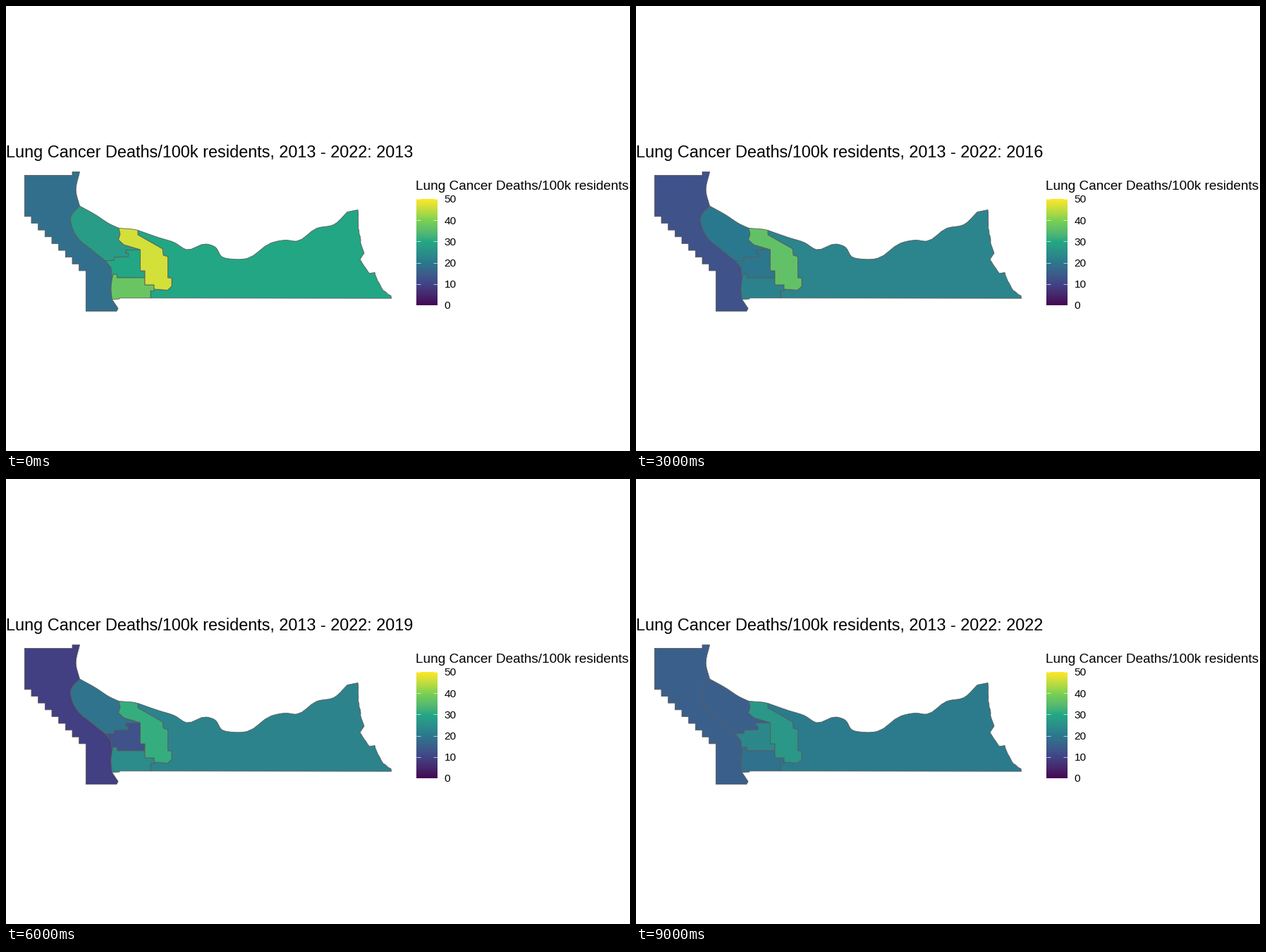
Write a matplotlib script that moves like this. It is 885x632 px and loops after 10 s.

```python
import numpy as np
import matplotlib.pyplot as plt
from matplotlib.animation import FuncAnimation
from matplotlib.colors import ListedColormap, to_rgb
from matplotlib.patches import Polygon

W, H, DPI = 885, 632, 64
PT = 72 / DPI  # points per pixel
YEARS = np.arange(2013, 2023)
LABEL = "Lung Cancer Deaths/100k residents"
STOPS = ["#440154", "#414487", "#2A788E", "#22A884", "#7AD151", "#FDE725"]

plt.rcParams["font.family"] = "Liberation Sans"


def lab_gradient(stops, n=300):
    """Blend evenly spaced colours in cube-rooted XYZ, which equals blending in Lab."""
    to_xyz = np.array([[0.4124, 0.3576, 0.1805],
                       [0.2126, 0.7152, 0.0722],
                       [0.0193, 0.1192, 0.9505]])
    linear = ((np.array([to_rgb(c) for c in stops]) + 0.055) / 1.055) ** 2.4
    roots = np.cbrt(linear @ to_xyz.T)
    at = np.linspace(0, len(stops) - 1, n)
    mixed = np.stack([np.interp(at, range(len(stops)), ch) for ch in roots.T], axis=1)
    linear = np.clip(mixed ** 3 @ np.linalg.inv(to_xyz).T, 0, 1)
    return ListedColormap(np.clip(1.055 * linear ** (1 / 2.4) - 0.055, 0, 1))


def curve(points, n=6):
    """Smooth line through the points: cubic Hermite over chord length."""
    p = np.array(points, float)
    t = np.r_[0, np.cumsum(np.hypot(*np.diff(p, axis=0).T))]
    slope = np.gradient(p, t, axis=0)
    line = []
    for a, b, ma, mb, d in zip(p, p[1:], slope, slope[1:], np.diff(t)):
        for s in np.arange(n) / n:
            line.append(a + (b - a) * s * s * (3 - 2 * s)
                        + d * s * (1 - s) * (ma * (1 - s) - mb * s))
    return line + [p[-1]]


def rough(points, gap=4, size=0.6):
    """Straight pieces broken up by small seeded wobbles."""
    rng = np.random.default_rng(4)
    line = []
    for a, b in zip(points, points[1:]):
        a, b = np.array(a, float), np.array(b, float)
        n = max(1, int(np.hypot(*(b - a)) / gap))
        line.append(a)
        line += [a + (b - a) * k / n + rng.uniform(-size, size, 2) for k in range(1, n)]
    return line + [np.array(points[-1], float)]


def stairs(x, y, run, rise, count):
    """Corners of a staircase going down to the right."""
    return [(x + run * (k + j), y + rise * k) for k in range(count) for j in (0, 1)]


# Borders shared by two regions, used in either direction
west_north = curve([(104.5, 284), (92, 299.5), (94, 315), (104, 332), (118, 343.5), (141, 362)])
west_center = [(141, 362), (149, 371.5), (150.5, 387)]
west_south = curve([(150.5, 387), (149, 400), (150.5, 416.8)])
north_strip = [(160, 315.5), (162, 324), (159.5, 332), (167, 339), (190.5, 346)]
north_center = [(141, 362), (153, 361.5), (153.5, 357), (173.5, 356), (173.5, 351),
                (170, 351), (170, 347), (190.5, 346)]
center_strip = [(190.5, 346), (190.5, 376), (197, 376), (197, 386)]
center_south = [(150.5, 387), (152, 381), (157, 381), (157.5, 386), (197, 386)]
south_strip = [(197, 386), (197, 396), (210, 396), (210, 402)]
south_east = [(210, 402), (210, 404.5), (205, 404.5), (205, 414.8)]
strip_east = [(187, 318.5), (187, 325), (222, 345), (223, 354), (229.5, 356),
              (229.5, 386), (235, 386.5), (235, 398), (229, 403.5), (210, 402)]

# Outer borders
west_top = [(26.3, 240.4), (94, 240.4), (94, 235.6)]
west_river = curve([(104.5, 235.6), (99.2, 262), (104.5, 284)])
west_foot = [(159, 429.5), (157, 433.4), (113.3, 433.4)]
north_river = curve([(104.5, 284), (127, 296.5), (147, 309.5), (160, 315.5)])
east_river = curve([(187, 318.5), (217, 329), (239, 336), (256, 346), (284, 338),
                    (297, 342.5), (306, 356), (322, 359.5), (342, 358.5), (376, 336.5),
                    (397, 332.5), (412, 334), (441, 315.5), (465, 310.5), (484, 292.5)], 4)
east_side = rough([(499, 289.5), (499.5, 315), (504, 340), (508, 351), (502, 360),
                   (515, 379.5), (523, 378.5), (527, 390), (535, 404), (546, 411.5),
                   (546.5, 415.2)])

shapes = {
    "west": west_top + west_river + west_north + west_center + west_south + west_foot
            + stairs(26.3, 298.9, 9.67, 9.63, 9)[::-1],
    "north": west_north + north_center + north_strip[::-1] + north_river[::-1],
    "east": east_river + east_side + south_east[::-1] + strip_east[::-1],
    "center": west_center + center_south + center_strip[::-1] + north_center[::-1],
    "south": west_south + [(161, 416), (161, 414.8)] + south_east[::-1]
             + south_strip[::-1] + center_south[::-1],
    "strip": north_strip + center_strip + south_strip + strip_east[::-1] + [(180, 317)],
}


def series(values, knots=(2013, 2014, 2015, 2016, 2018, 2020, 2022)):
    return np.interp(YEARS, knots, values)


rates = {
    "west": series([18.3, 4.5, 18.3, 12.5, 12, 12, 9, 9, 15],
                   [2013, 2014, 2015, 2016, 2017, 2018, 2019, 2021, 2022]),
    "north": series([27.5, 14.5, 21.5, 20, 22, 16, 15]),
    "east": series([29.5, 10.3, 36, 22.5, 20.8, 23.7, 20.8]),
    "center": series([29.5, 13.5, 29.5, 19.5, 12, 13.5, 23]),
    "south": series([37, 18.5, 34.7, 22, 18, 29.8, 18.7]),
    "strip": series([46.4, 20.7, 46.7, 36, 27.5, 35, 26.5]),
}

cmap = lab_gradient(STOPS)
fig = plt.figure(figsize=(W / DPI, H / DPI), dpi=DPI, facecolor="white")
ax = fig.add_axes([0, 0, 1, 1])


def write(x, y, text, px):
    return ax.text(x, y, text, fontsize=px * PT, color="black", ha="left", va="baseline")


def draw_legend(left=582, right=612, top=274, bottom=425):
    ax.imshow(np.linspace(1, 0, 300)[:, None], cmap=cmap, aspect="auto",
              extent=(left, right, bottom, top), interpolation="nearest")
    write(581, 261, LABEL, 19.05)
    tick = (right - left) / 5
    for value in range(0, 51, 10):
        y = bottom + (top - bottom) * value / 50
        for x in (left, right - tick):
            ax.plot([x, x + tick], [y, y], color="white", lw=0.66 * PT,
                    solid_capstyle="butt")
        write(621.4, y + 5.4, str(value), 15.4)


draw_legend()
title = write(0, 215, "", 23.45)
regions = {name: ax.add_patch(Polygon(points, closed=True, ec="#595959", lw=0.8 * PT,
                                      joinstyle="round"))
           for name, points in shapes.items()}
ax.set_xlim(0, W)
ax.set_ylim(H, 0)
ax.axis("off")


def update(i):
    title.set_text(f"{LABEL}, 2013 - 2022: {YEARS[i]}")
    for name, patch in regions.items():
        patch.set_facecolor(cmap(rates[name][i] / 50))
    return [title, *regions.values()]


anim = FuncAnimation(fig, update, frames=len(YEARS), interval=1000,
                     repeat=True, repeat_delay=0, blit=False)
plt.show()
```
